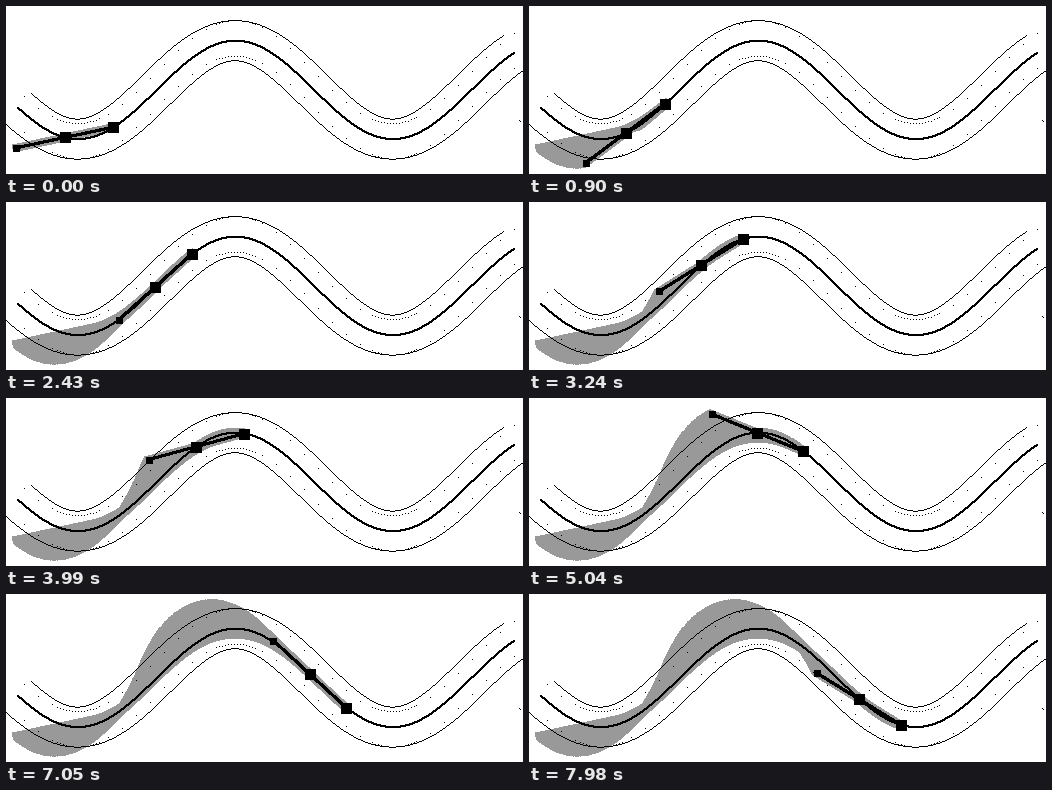
Write a matplotlib script that moves like this. It is 517x168 px and loops after 8 s.

```python
import numpy as np
import matplotlib.pyplot as plt
from matplotlib.animation import FuncAnimation
from matplotlib.collections import LineCollection

W, H, DPI = 517, 168, 128
PX = 72 / DPI               # one pixel in points
PEAK_X, MID_Y, AMP, SCALE = 229, 83.9, 49.2, 50.1
LANE = 20                   # half width of the lane
ARM = 49.5                  # distance from the centre to the front of the bar
START_X = 107.2
INTERVAL, FRAMES = 20, 400
STEP_MS = 30


def road(x):
    return MID_Y - AMP * np.cos((x - PEAK_X) / SCALE)


def offset(x, d):
    slope = AMP / SCALE * np.sin((x - PEAK_X) / SCALE)
    n = np.hypot(1, slope)
    return x - d * slope / n, road(x) + d / n


def bar(front_x):
    """Tail, centre and front of a bar whose centre and front ride the road."""
    front = np.array([front_x, road(front_x)])
    lo, hi = front_x - ARM, front_x
    for _ in range(30):
        x = (lo + hi) / 2
        if np.hypot(front[0] - x, front[1] - road(x)) > ARM:
            lo = x
        else:
            hi = x
    centre = np.array([lo, road(lo)])
    return np.array([2 * centre - front, centre, front])


steps = FRAMES * INTERVAL // STEP_MS
bars = [bar(START_X + s) for s in range(steps)]

fig = plt.figure(figsize=(W / DPI, H / DPI), dpi=DPI, facecolor="white")
ax = fig.add_axes([0, 0, 1, 1])

# Crisp one-pixel lines go into a transparent layer.
layer = np.zeros((H, W, 4))


def stamp(x, y):
    col, row = np.floor(x).astype(int), np.floor(y).astype(int)
    ok = (col >= 0) & (col < W) & (row >= 0) & (row < H)
    layer[row[ok], col[ok], 3] = 1


def columns(x, y):
    """One pixel in each column of a curve."""
    cols = np.arange(np.ceil(x[0]), x[-1]) + 0.5
    return cols, np.interp(cols, x, y)


xs = np.linspace(11, 508, 1000)
cx, cy = columns(xs, road(xs))
for dx in (-0.5, 0.5):
    for dy in (-0.5, 0.5):
        stamp(cx + dx, cy + dy)

# Dots are close together in the bends and sparse on the flanks.
dots = np.arange(17, 510)
bend = np.abs(np.sin((dots - PEAK_X) / SCALE)) < 0.42
dots = dots[np.where(bend, dots % 3 == 0, dots % 14 == 4)]
for side in (-1, 1):
    stamp(*columns(*offset(xs, side * LANE)))
    # this wave meets the lane edge outside the bend and cuts in inside it
    wave = (MID_Y + side * (LANE - 2.2)
            - (AMP + 2.2) * np.cos((dots - PEAK_X) / SCALE))
    stamp(dots, wave)
stamp(np.array([513, 514]), np.array([114, 115]))

ax.imshow(layer, extent=(0, W, H, 0), interpolation="nearest",
          aspect="auto", zorder=2)
ax.set_xlim(0, W)
ax.set_ylim(H, 0)
ax.axis("off")


def squares(size):
    return ax.plot([], [], "s", color="black", ms=size * PX, mew=0,
                   zorder=5)[0]


swept = LineCollection([], colors="#999999", linewidths=7 * PX,
                       capstyle="projecting", antialiaseds=False, zorder=1)
ax.add_collection(swept)
rod = ax.plot([], [], color="black", lw=2 * PX, antialiased=False,
              zorder=4)[0]
joints = squares(11)
tail = squares(7)


def draw(i):
    step = max(0, i * INTERVAL // STEP_MS - 1)
    pts = bars[step]
    swept.set_segments([b[[0, 2]] for b in bars[:step + 1]])
    rod.set_data(pts[:, 0], pts[:, 1])
    joints.set_data(pts[1:, 0], pts[1:, 1])
    tail.set_data(pts[:1, 0], pts[:1, 1])
    return swept, rod, joints, tail


anim = FuncAnimation(fig, draw, frames=FRAMES, interval=INTERVAL,
                     init_func=lambda: draw(0), repeat=True, repeat_delay=0,
                     blit=False)
plt.show()
```
